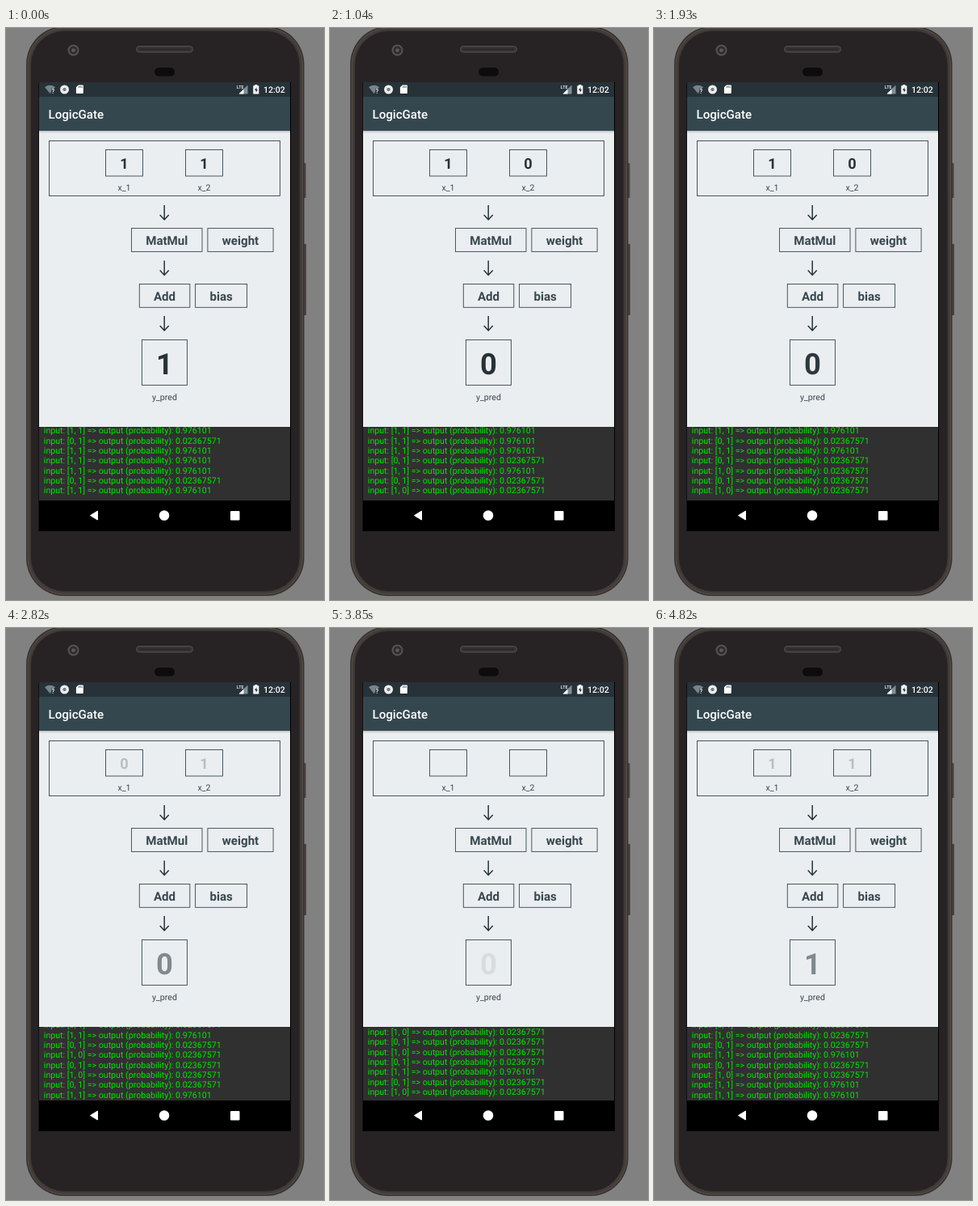
Write an HTML page that moves like this. It is 394 px wide and 707 px high and loops after 4.92 s.

```html
<!DOCTYPE html>
<html lang="en">
<head>
<meta charset="utf-8">
<title>LogicGate</title>
<style>
html, body { margin: 0; width: 100%; height: 100%; overflow: hidden; background: #818181; }
svg { display: block; width: 394px; height: 707px; }
text { font-family: Roboto, sans-serif; font-size: 10.6px; fill: #37474f; text-rendering: geometricPrecision; }
.mid { text-anchor: middle; }
.op { font-size: 15.1px; font-weight: 700; }
.digit { font-size: 18.2px; font-weight: 700; fill: #263238; }
#y { font-size: 36.4px; }
.bar { fill: #fff; font-weight: 500; }
.box { fill: none; stroke: #37474f; stroke-width: .9; }
.arrow { fill: none; stroke: #263238; stroke-width: 1.5; }
#log text { font-size: 10.64px; fill: #00e800; white-space: pre; }
</style>
</head>
<body>
<svg viewBox="0 0 394 707">
  <defs>
    <linearGradient id="shade" x2="0" y2="1">
      <stop stop-opacity=".22"/><stop offset="1" stop-opacity="0"/>
    </linearGradient>
    <clipPath id="logClip"><path d="M41 493h311v91H41z"/></clipPath>
  </defs>

  <!-- phone -->
  <path d="M368 167h3.500v43H368zM368 267h4v88H368z" fill="#474240"/>
  <rect x="25" y="-2" width="344.500" height="704" rx="47" fill="#36312f"/>
  <rect x="27" y="0" width="340.500" height="700" rx="45" fill="#433d3a" stroke="#57504c"/>
  <rect x="30.500" y="3.500" width="333.500" height="693" rx="42" fill="#272324" stroke="#393432"/>
  <rect x="161.500" y="22.500" width="70" height="7.500" rx="3.700" fill="#393536" stroke="#544f4e"/>
  <path d="M165 26.300h63" stroke="#2b2727" stroke-width="2"/>
  <circle cx="83.500" cy="27.500" r="6" fill="#302c2d" stroke="#575253" stroke-width="2"/>
  <circle cx="83.500" cy="27.500" r="2.300" fill="#5d5859"/>
  <rect x="184" y="49" width="25" height="10.500" rx="5.200" fill="#0d0b0c"/>

  <!-- screen -->
  <path d="M40.500 67H353v555H40.500z"/>
  <path d="M41 67h311v18H41z" fill="#263238"/>
  <path d="M41 127h311v366H41z" fill="#ebeef0"/>
  <path d="M41 85h311v42H41z" fill="#34474f"/>
  <path d="M41 127h311v3H41z" fill="url(#shade)"/>
  <path d="M41 493h311v91H41z" fill="#303030"/>

  <!-- status bar -->
  <path d="M48 73q6.500-4.500 13 0l-6.500 8z" fill="#77858b"/>
  <path d="M56 75h6v7h-6z" fill="#263238"/>
  <text x="56.300" y="81" class="bar" style="font-size:8px">?</text>
  <circle cx="72.500" cy="76" r="5.500" fill="#eee"/>
  <circle cx="72.500" cy="76" r="2.800" fill="#77858b" stroke="#fff"/>
  <path d="M89.800 70.500H95q.8 0 .8.8v9q0 .8-.8.8h-7.300q-.8 0-.8-.8v-7z" fill="#fff"/>
  <path d="M90.500 71.800v2M92.300 71.800v2M94.100 71.800v2" stroke="#263238" stroke-width=".8"/>
  <path d="M299.500 70.500v11h-11z" fill="#819097"/>
  <path d="M294.500 75.500v6h-6z" fill="#fff"/>
  <text x="285.800" y="75.300" class="bar" style="font-size:5.500px">LTE</text>
  <path d="M308.300 70h3v1.300h2V81.500h-7V71.300h2z" fill="#fff"/>
  <path d="M310.500 73l-2.500 4h1.600v3l2.400-4h-1.500z" fill="#263238"/>
  <text x="319" y="80" class="bar">12:02</text>
  <text x="52.500" y="112" class="bar" style="font-size:15.100px">LogicGate</text>

  <g id="graph"></g>
  <text id="x1" class="mid digit" x="146.500" y="173.500"></text>
  <text id="x2" class="mid digit" x="245.500" y="173.500"></text>
  <text id="y" class="mid digit" x="196.500" y="427.500"></text>
  <g clip-path="url(#logClip)"><g id="log"></g></g>

  <!-- navigation -->
  <path d="M104.500 602.500l9-5.500v11z" fill="#fff" stroke="#fff" stroke-linejoin="round"/>
  <circle cx="196" cy="602.500" r="6.300" fill="#fff"/>
  <rect x="278" y="597" width="11.500" height="11.500" rx="1" fill="#fff"/>
</svg>
<script>
const LOOP = 4920, STEP = 140, LINE = 12.33;
const $ = id => document.getElementById(id);
const clamp = v => Math.max(0, Math.min(1, v));

const box = (x, y, w, h) => `<rect class="box" x="${x}" y="${y}" width="${w}" height="${h}"/>`;
const label = (x, y, s, cls = "") => `<text class="mid ${cls}" x="${x}" y="${y}">${s}</text>`;
const op = (x, y, w, s) => box(x, y, w, 28.8) + label(x + w / 2, y + 20.5, s, "op");
const arrow = y => `<path class="arrow" d="M196.200 ${y}v18m-5.500-6l5.500 6 5.500-6"/>`;

$("graph").innerHTML =
  box(53.5, 139.5, 286, 68) + box(123.5, 150.5, 46, 32.5) + box(222.5, 150.5, 46, 32.5) +
  label(146.5, 200.5, "x_1") + label(245.5, 200.5, "x_2") +
  op(155.5, 247.6, 87.5, "MatMul") + op(249.9, 247.6, 81.2, "weight") +
  op(165.3, 316.5, 62.5, "Add") + op(234.6, 316.5, 64, "bias") +
  box(168.4, 385.4, 56, 56) + label(196.5, 459.5, "y_pred") +
  [219, 287.5, 356].map(arrow).join("");

// Inputs already logged, then each new input with its start time.
const past = ["11", "01", "11", "11", "11", "01", "11"];
const events = [[153, "01"], [645, "10"], [1193, "01"], [1675, "10"], [2209, "01"],
  [2715, "11"], [3250, "01"], [3703, "10"], [4255, "11"], [4715, "11"]];
// The screen refreshes only at these times.
const ticks = [0, 300, 450, 740, 890, 1040, 1340, 1480, 1780, 1930, 2370, 2520, 2820,
  2960, 3110, 3250, 3400, 3550, 3850, 3990, 4290, 4430, 4580, 4820];

const inputs = past.concat(events.map(e => e[1]));
$("log").innerHTML = inputs.map(([a, b], i) =>
  `<text x="46.800" y="${575.2 + i * LINE}">input: [${a}, ${b}] => output (probability): ${
    a & b ? "0.976101" : "0.02367571"}</text>`).join("");

function show(id, value, alpha) {
  $(id).textContent = value;
  $(id).setAttribute("opacity", alpha);
}

function draw(now) {
  const t = ticks.filter(k => k <= now % LOOP).pop();
  const count = events.filter(e => e[0] <= t).length;
  const last = past.length + count - 1;
  const u = count ? (t - events[count - 1][0]) / STEP : 9;

  // Fade the old values out, then the new ones in; the output lags behind.
  const [a, b] = inputs[u < 1.07 ? last - 1 : last];
  const [c, d] = inputs[u < 1.1 ? last - 1 : last];
  const inAlpha = u < 1.07 ? clamp(1 - u) : clamp((u - 1.1) / 0.6);
  const outAlpha = u < 1.1 ? clamp(1 - (u / 1.1) ** 2) : clamp((u - 1.15) / 0.7);
  show("x1", a, inAlpha);
  show("x2", b, inAlpha);
  show("y", c & d, outAlpha);

  const scroll = (1 + Math.cos(Math.PI * clamp(u / 1.4))) / 2;
  $("log").setAttribute("transform", `translate(0 ${(scroll - last) * LINE})`);
  [...$("log").children].forEach((line, i) => line.style.display = i > last ? "none" : "");
}

const start = performance.now();
function frame() {
  draw(performance.now() - start);
  requestAnimationFrame(frame);
}
frame();
</script>
</body>
</html>
```
